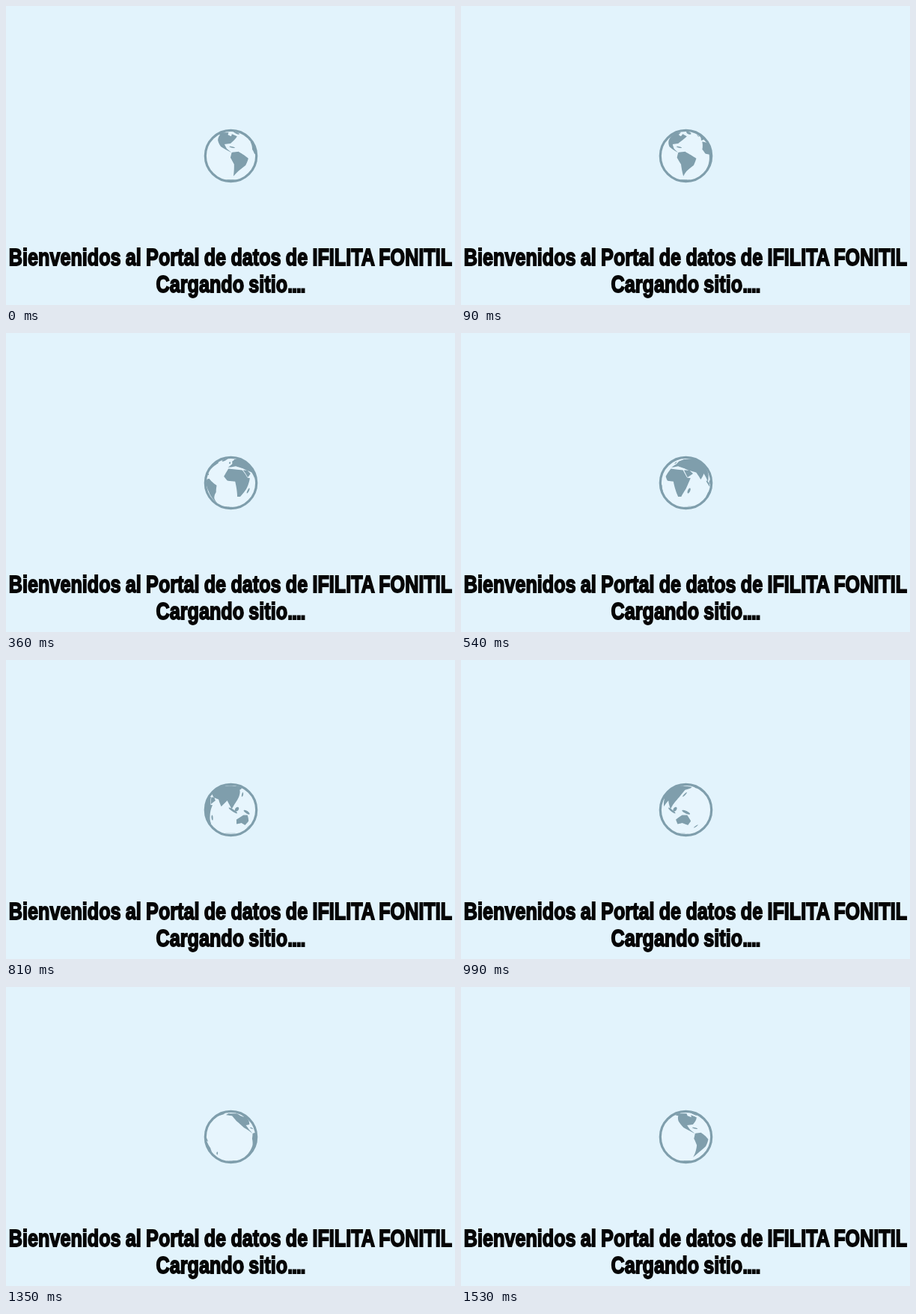
Animation of 600x400 px, one loop 1.62 s. Source, as an HTML page with a canvas:

```html
<!DOCTYPE html>
<html lang="es">
<head>
<meta charset="utf-8">
<title>Cargando sitio</title>
<style>
html, body { margin: 0; width: 600px; height: 400px; overflow: hidden; background: #e2f3fc; }
canvas, svg { position: absolute; left: 0; top: 0; }
text {
  font: bold 32px "Liberation Sans", Arial, sans-serif;
  text-anchor: middle;
  word-spacing: -.9px;
  fill: #060606;
  stroke: #060606;
  stroke-width: 1.8px;
}
</style>
</head>
<body>
<canvas id="globe" width="600" height="400"></canvas>
<svg width="600" height="400">
  <g transform="translate(300 0) scale(.787 1)">
    <text y="346.7">Bienvenidos al Portal de datos de IFILITA FONITIL</text>
    <text y="382.7">Cargando sitio<tspan letter-spacing="-1.5">....</tspan></text>
  </g>
</svg>
<script>
const STEP = 90, STEPS = 18, START = -80;
const CX = 300.5, CY = 200.5, R = 33.2;
const INK = '#7f9eac', SEA = '#e7f5fd';
const RAD = Math.PI / 180;
const ctx = document.getElementById('globe').getContext('2d');

// Key corners of each coast as longitude, latitude pairs.
const coast = (...v) => v.flatMap((lon, i) => i % 2 ? [] : [[lon, v[i + 1]]]);

// A spindle between two ends.
function island(lon0, lat0, lon1, lat1, fat) {
  return Array.from({ length: 12 }, (_, i) => {
    const a = i * Math.PI / 6;
    const f = (1 - Math.cos(a)) / 2, side = fat * Math.sin(a);
    const dx = lon1 - lon0, dy = lat1 - lat0, len = Math.hypot(dx, dy);
    return [lon0 + dx * f - dy / len * side, lat0 + dy * f + dx / len * side];
  });
}

const polarCap = Array.from({ length: 37 }, (_, i) => {
  const lon = i * 10 - 180;
  return [lon, 4 * Math.cos((lon - 95) * RAD) - 74];
});

const northAmerica = coast(-165,62, -156,71, -95,70, -93,58, -79,52, -75,62, -56,52,
  -81,30, -97,28, -90,17, -79,8, -106,22, -123,40, -135,58);
const southAmerica = coast(-78,8, -62,10, -35,-6, -40,-22, -58,-38, -70,-55, -72,-20, -81,-4);
const africa = coast(-17,15, -7,35, 32,31, 43,12, 51,11, 40,-14, 27,-34, 18,-34, 10,3, -8,5);
const eurasia = coast(-9,38, 5,50, 6,60, 25,71, 100,77, 180,68, 160,60, 137,54, 121,30,
  108,12, 102,2, 91,22, 77,8, 67,25, 48,30, 35,36, 15,42);
const arabia = coast(35,31, 50,30, 58,22, 44,13);
const australia = coast(114,-23, 131,-12, 143,-12, 153,-27, 146,-38, 130,-32, 116,-35);

const lands = [
  northAmerica, southAmerica, africa, eurasia, arabia, australia, polarCap,
  island(-45, 60, -40, 82, 14),   // Greenland
  island(-84, 22, -70, 19, 1.5),  // Cuba
  island(-4, 50, -4, 58, 3),      // Britain
  island(45, -25, 50, -12, 3),    // Madagascar
  island(131, 32, 143, 45, 2),    // Japan
  island(95, 5, 115, -8, 2.5),    // Sumatra and Java
  island(110, -3, 118, 6, 4),     // Borneo
  island(131, -1, 150, -10, 3),   // New Guinea
  island(167, -46, 178, -37, 2),  // New Zealand
];

// Orthographic view; hidden points are pushed out past the limb.
function project(lon, lat, view) {
  const a = (lon - view) * RAD, b = lat * RAD;
  const x = Math.sin(a) * Math.cos(b), y = Math.sin(b);
  const front = Math.cos(a) > 0;
  const k = front ? R : 1.2 * R / (Math.hypot(x, y) || 1);
  return { x: CX + x * k, y: CY - y * k, front };
}

function drawLand(pts, view) {
  const cuts = 8;
  let seen = false;
  ctx.beginPath();
  pts.forEach(([lon, lat], i) => {
    const [lon2, lat2] = pts[(i + 1) % pts.length];
    for (let c = 0; c < cuts; c++) {
      const f = c / cuts;
      const p = project(lon + (lon2 - lon) * f, lat + (lat2 - lat) * f, view);
      seen = seen || p.front;
      ctx.lineTo(p.x, p.y);
    }
  });
  if (seen) ctx.fill();
}

function disc(r) {
  ctx.beginPath();
  ctx.arc(CX, CY, r, 0, 2 * Math.PI);
}

function draw(view) {
  ctx.clearRect(0, 0, 600, 400);
  ctx.save();
  disc(34);
  ctx.fillStyle = SEA;
  ctx.fill();
  ctx.clip();
  ctx.fillStyle = INK;
  lands.forEach(pts => drawLand(pts, view));
  ctx.restore();
  disc(34.2);
  ctx.strokeStyle = INK;
  ctx.lineWidth = 3.2;
  ctx.stroke();
}

function tick() {
  const step = Math.floor(performance.now() / STEP) % STEPS;
  draw(START + step * 360 / STEPS);
  requestAnimationFrame(tick);
}
tick();
</script>
</body>
</html>
```
